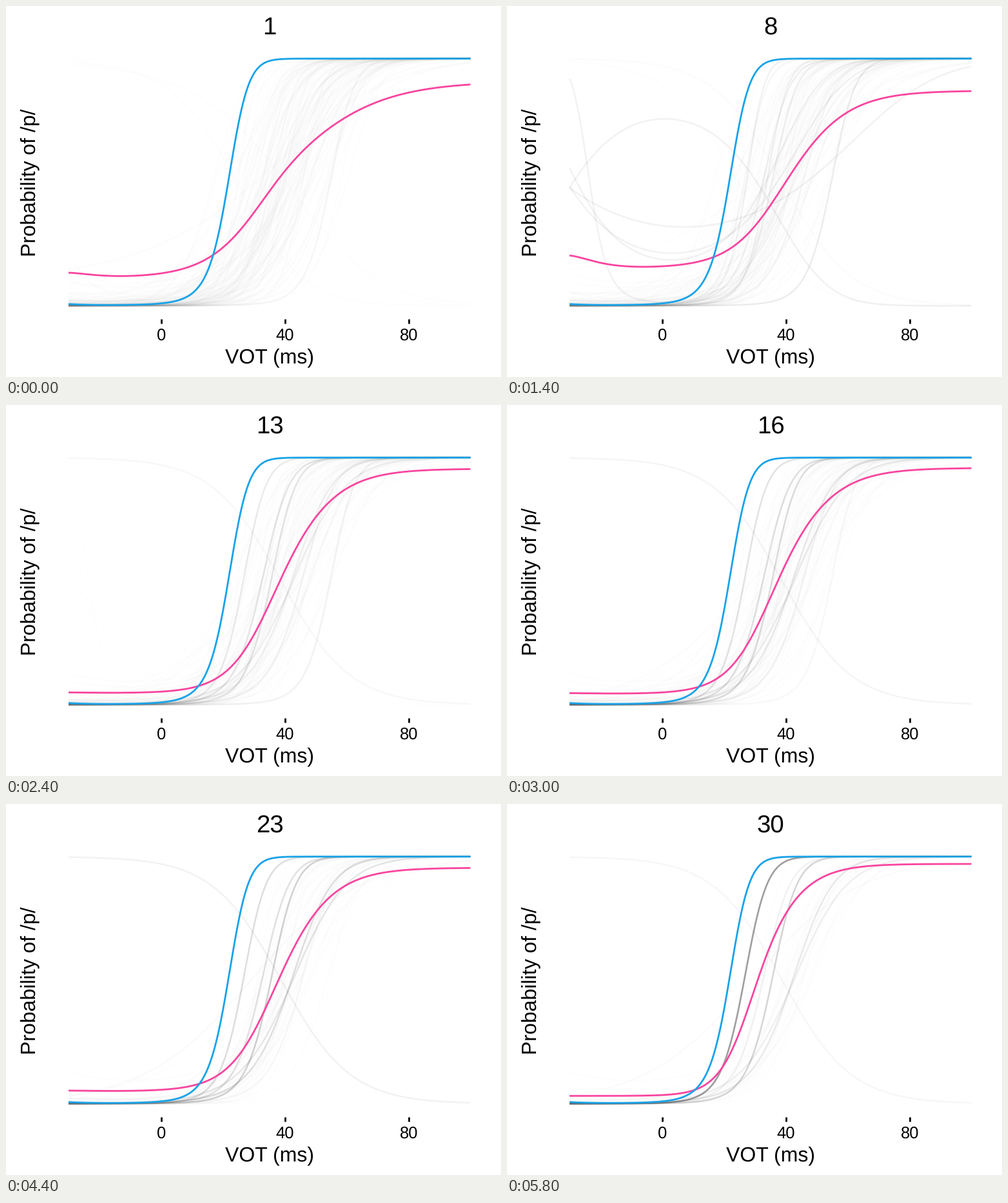
A matplotlib script for the animation above (6 s loop, 768 by 576 pixels).

```python
import numpy as np
import matplotlib.pyplot as plt
from matplotlib.animation import FuncAnimation
from matplotlib.collections import LineCollection

W, H, DPI = 768, 576, 100
PX = 72 / DPI
FRAMES = 30
BOTTOM, TOP = 465.5, 81.7
BLUE, PINK = "#18a3e8", "#f9459f"

plt.rcParams.update({"font.family": "Liberation Sans", "text.hinting": "none"})
x = np.linspace(97, 720.5, 300)
steps = np.arange(1, FRAMES + 1)


def logistic(z):
    return 1 / (1 + np.exp(-np.clip(z, -30, 30)))


def curve(mid, slope, bend):
    """Logistic curve with a quadratic exponent, in stage pixels."""
    t = x - mid
    return BOTTOM - (BOTTOM - TOP) * logistic(slope * t + bend * t * t)


def mean_curve(low, high, mid, left, right, dip):
    """Logistic curve whose steepness drifts from left to right."""
    t = x - mid
    slope = (left + right + (right - left) * np.tanh(t / 80)) / 2
    return (low - (low - high) * logistic(slope * t)
            - dip * np.exp(-(((x - 97) / 52) ** 1.5)))


# Mean response at key steps: low, high, mid, slopes left and right, dip
KEYS = [1, 5, 8, 13, 19, 23, 30]
MEAN = np.array([
    [422.5, 117, 422, .0205, .0138, 8],
    [432, 113, 436, .0248, .0222, 8],
    [407, 131.5, 435, .0238, .0210, 19.5],
    [447.3, 99, 425, .0273, .0222, 1],
    [449.5, 96.5, 415.5, .0293, .0223, 1],
    [446, 99, 423, .0275, .0233, 1],
    [453.2, 93, 389, .0380, .0270, 0],
])
means = [mean_curve(*[np.interp(s, KEYS, col) for col in MEAN.T])
         for s in steps]

# Leading candidates: mid, slope, peak opacity in percent, peak step, spread
LEADERS = [
    (368, .055, 13, 20, 7),
    (368, .055, 37, 31, 3),
    (411, .050, 18, 25, 11),
    (397, .046, 13, 19, 8),
    (445, .024, 9, 22, 9),
    (443, .031, 12, 23, 8),
    (459, .038, 5, 15, 8),
    (503, .052, 7, 8, 6),
    (403, .060, 5, 8, 4),
    (380, .012, 2, 24, 7),
    (427, -.0187, 5, 22, 8),
]
# Bowed candidates that show up together: mid, slope, bend
BOWS = [
    (387.6, -.0159, -5.58e-5),
    (464, .0080, 2.11e-5),
    (419, .0160, 4.9e-5),
    (401, .0202, 6.9e-5),
    (371.6, .0691, 28.4e-5),
]


def pulse(peak, when, spread):
    return peak / 100 * np.exp(-((steps - when) / spread) ** 2 / 2)


# Crowd of faint candidates that thins out and narrows
rng = np.random.default_rng(7)
CROWD = 120
life = 2 + 36 * rng.random(CROWD) ** 1.4
mids = 432 + rng.normal(size=CROWD) * (28 + 1.2 * np.clip(30 - life, 0, 30))
slopes = np.exp(rng.normal(np.log(.033), .4, CROWD))
bends = slopes * rng.uniform(0, .0022, CROWD)
flip = (rng.random(CROWD) < .05) & (life < 10)
slopes[flip] *= -.6
bends[flip] *= -.2
flicker = .005 + .005 * rng.random((CROWD, FRAMES))

lines = [curve(*p) for p in zip(mids, slopes, bends)]
lines += [curve(m, s, .0028 * max(s - .02, 0)) for m, s, *_ in LEADERS]
lines += [curve(*p) for p in BOWS]
alphas = np.vstack([np.where(steps <= life[:, None], flicker, 0),
                    [pulse(*p[2:]) for p in LEADERS],
                    [pulse(5, 8, 2.3)] * len(BOWS)])

fig = plt.figure(figsize=(W / DPI, H / DPI), dpi=DPI, facecolor="white")
ax = fig.add_axes([0, 0, 1, 1])
ax.set(xlim=(0, W), ylim=(H, 0))
ax.axis("off")


def label(px, py, text, size, **kw):
    return ax.text(px, py, text, ha="center", va="baseline", color="black",
                   fontsize=size * PX, **kw)


for value in (0, 40, 80):
    tx = 240.7 + 4.8 * value
    ax.plot([tx, tx], [485.7, 493], color="black", lw=2.8 * PX,
            solid_capstyle="butt")
    label(tx, 519, str(value), 25.6)
label(409, 554, "VOT (ms)", 32)
label(45, 274, "Probability of /p/", 32, rotation=90, rotation_mode="anchor")
title = label(409, 44, "1", 38.4)

greys = LineCollection([np.column_stack([x, y]) for y in lines],
                       linewidths=2.6 * PX, capstyle="butt", zorder=2)
ax.add_collection(greys)
style = dict(lw=2.8 * PX, solid_capstyle="butt")
mean_line, = ax.plot(x, means[0], color=PINK, zorder=3, **style)
ax.plot(x, curve(344.7, .062, 17e-5), color=BLUE, zorder=4, **style)


def update(i):
    rgba = np.zeros((len(lines), 4))
    rgba[:, 3] = alphas[:, i]
    greys.set_color(rgba)
    mean_line.set_ydata(means[i])
    title.set_text(str(i + 1))
    return greys, mean_line, title


anim = FuncAnimation(fig, update, frames=FRAMES, interval=200,
                     repeat=True, repeat_delay=0)
plt.show()
```
